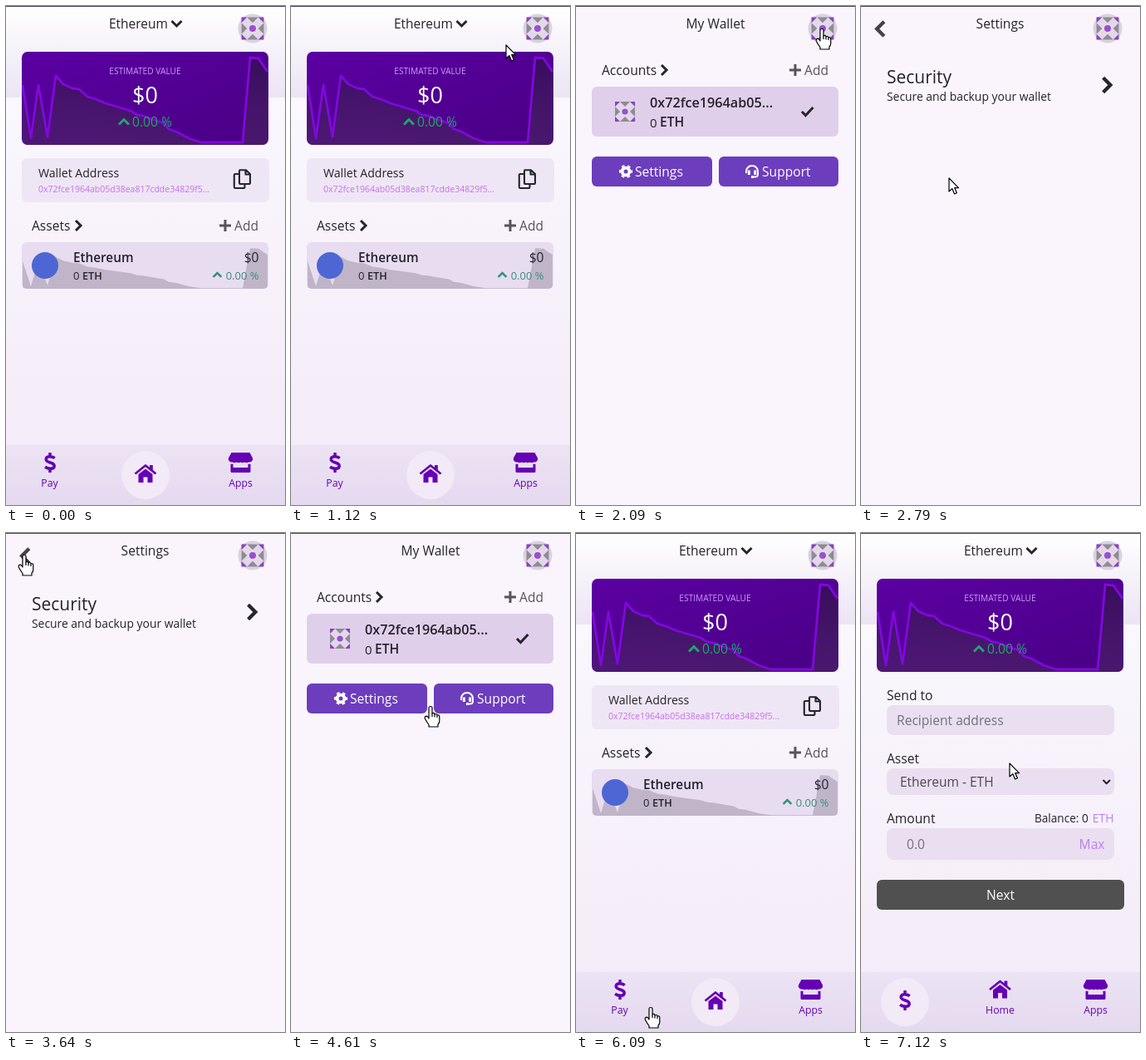
These frames come from a looping animation (336 by 600 pixels, 7.18 s). An HTML page:

```html
<!DOCTYPE html>
<html lang="en">
<head>
<meta charset="utf-8">
<title>Wallet walkthrough</title>
<style>
html, body { margin: 0; width: 100%; height: 100%; overflow: hidden; background: #faf5fc; }
svg { display: block; width: 336px; height: 600px; font: 15.6px "Open Sans", "Noto Sans", sans-serif; fill: #25222b; color: #25252c; }
.mid { text-anchor: middle; }
.end { text-anchor: end; }
.bold { font-weight: 600; }
.btn { font-weight: 500; fill: #fff; }
.s10 { font-size: 10.2px; }
.s13 { font-size: 13px; }
.nav { font-size: 12.3px; text-anchor: middle; }
.brand { fill: #6500b5; }
.grey { fill: #757079; }
.lilac { fill: #bd7deb; }
.line { fill: none; stroke: currentColor; stroke-width: 3; }
.thin { stroke-width: 2.1; stroke-linejoin: round; }
.field { fill: #eadff0; }

/* Page cuts and cursor, 7180 ms per loop */
.page, .arrow, .hand { opacity: 0; animation: 7180ms step-end infinite; }
.base { animation-name: base; }
.home { animation-name: home; }
.wallet { animation-name: wallet; }
.settings { animation-name: settings; }
.pay { animation-name: pay; }
.arrow { animation-name: arrow; }
.hand { animation-name: hand; }
.cursor { animation: move 7180ms ease-in-out infinite; }

@keyframes base { 0%, 70.752% { opacity: 1 } 25.07% { opacity: 0 } 100% { opacity: 1 } }
@keyframes home { 0%, 70.752% { opacity: 1 } 25.07%, 89.415%, 100% { opacity: 0 } }
@keyframes wallet { 0%, 36.908%, 70.752%, 100% { opacity: 0 } 25.07%, 54.318% { opacity: 1 } }
@keyframes settings { 0%, 54.318%, 100% { opacity: 0 } 36.908% { opacity: 1 } }
@keyframes pay { 0% { opacity: 0 } 89.415%, 100% { opacity: 1 } }
@keyframes hand {
  0%, 31.894%, 37.465%, 54.735%, 65.32%, 71.309%, 92.758%, 100% { opacity: 0 }
  22.981%, 34.819%, 48.05%, 63.928%, 68.106%, 84.262% { opacity: 1 }
}
@keyframes arrow {
  0%, 22.981%, 34.819%, 48.05%, 63.928%, 68.106%, 84.262% { opacity: 0 }
  9.749%, 31.894%, 37.465%, 54.735%, 65.32%, 71.309%, 92.758%, 100% { opacity: 1 }
}
@keyframes move {
  0%, 9.749% { transform: translate(93px, 600px); animation-timing-function: ease-in }
  11.838% { transform: translate(143px, 433px); animation-timing-function: ease-out }
  15.599%, 20.891% { transform: translate(259px, 47px) }
  23.677%, 31.337% { transform: translate(296px, 28px) }
  35.515%, 42.479% { transform: translate(106px, 207px) }
  48.747%, 61.699% { transform: translate(22px, 27px) }
  64.206% { transform: translate(168px, 209px) }
  68.942%, 73.12% { transform: translate(296px, 28px) }
  84.819% { transform: translate(90px, 571px) }
  87.047%, 92.618% { transform: translate(55px, 562px) }
  98.886%, 100% { transform: translate(179px, 277px) }
}
</style>
</head>
<body>
<svg viewBox="0 0 336 600">
  <defs>
    <linearGradient id="top" x2="0" y2="1"><stop stop-color="#fff"/><stop offset="1" stop-color="#ece4f4"/></linearGradient>
    <linearGradient id="body" x2="0" y2="1"><stop stop-color="#faf7fd"/><stop offset="1" stop-color="#f4ecf8"/></linearGradient>
    <linearGradient id="dock" x2="0" y2="1"><stop stop-color="#ece3f4"/><stop offset="1" stop-color="#e5d9ef"/></linearGradient>
    <linearGradient id="deep" x2="1" y2="1"><stop stop-color="#5b00a3"/><stop offset="1" stop-color="#490084"/></linearGradient>
    <linearGradient id="shade" x2="0" y2="1"><stop stop-color="#2a1440" stop-opacity=".65"/><stop offset="1" stop-color="#4a3058" stop-opacity=".5"/></linearGradient>
    <clipPath id="frame"><rect width="297" height="112" rx="7"/></clipPath>
    <clipPath id="row"><rect x="19" y="284" width="297" height="56" rx="6"/></clipPath>

    <path id="trend" d="M1 40L11 104L20 40L31 102L41 29L50 39L61 44L69 45L79 54L89 57L101 62L111 65L131 71L139 76L146 77L156 81L171 86L177 93L186 96L201 104L216 109H266L275 7L285 8L296 24"/>
    <path id="area" d="M1 40L11 104L20 40L31 102L41 29L50 39L61 44L69 45L79 54L89 57L101 62L111 65L131 71L139 76L146 77L156 81L171 86L177 93L186 96L201 104L216 109H266L275 7L285 8L296 24V112H1Z"/>
    <path id="chev" class="line" d="M-6 -3L0 3L6 -3"/>
    <path id="plus" class="line" d="M-7 0H7M0 -7V7"/>

    <g id="quarter">
      <path fill="#8b43bd" d="M-12 -12H-6L-12 -6Z"/>
      <path fill="#8f8a94" d="M-6 -12H6L0 -6Z"/>
    </g>
    <g id="avatar">
      <path fill="#e1d8e8" d="M-12 -12H12V12H-12Z"/>
      <use href="#quarter"/><use href="#quarter" transform="rotate(90)"/>
      <use href="#quarter" transform="rotate(180)"/><use href="#quarter" transform="rotate(270)"/>
      <circle r="6" fill="#e4dbea"/><circle r="3.6" fill="#9a4fd0"/>
    </g>

    <path id="dollar" fill="none" stroke="#6500b5" stroke-width="3.5" d="M5.7 -5.3C2 -8 -4.8 -8.2 -4.8 -4C-4.8 1 5.2 -1 5.2 4C5.2 8.4 -2 8 -6 5.2M0 -12V-7M0 7V12"/>
    <g id="house" class="brand">
      <path fill="none" stroke="#6500b5" stroke-width="2.8" stroke-linejoin="round" d="M-12.5 .5L0 -9.5L12.5 .5"/>
      <path d="M-8.5 1L0 -5.5L8.5 1V11H2.5V4.5H-2.5V11H-8.5ZM5 -10H8.8V-3L5 -6Z"/>
    </g>
    <g id="store">
      <path d="M-11 -12H11L14.5 -5.5C15.5 -2 12 0 9.5 -.5Q7 1 4.8 -.6Q2.4 1 0 -.6Q-2.4 1 -4.8 -.6Q-7 1 -9.5 -.5C-12 0 -15.5 -2 -14.5 -5.5Z"/>
      <path d="M-12 1.8H-9V6H9V1.8H12V10.5Q12 12 10.5 12H-10.5Q-12 12 -12 10.5Z"/>
    </g>
    <g id="add" color="#57525c">
      <use href="#plus" x="264"/><text class="end" x="304" y="6" fill="#57525c">Add</text>
    </g>
  </defs>

  <rect width="336" height="600" fill="#faf5fc"/>

  <g class="page base">
    <rect width="336" height="110" fill="url(#top)"/>
    <rect y="110" width="336" height="418" fill="url(#body)"/>
    <rect y="528" width="336" height="72" fill="url(#dock)"/>
    <text x="124" y="27" font-size="15.5">Ethereum</text>
    <use href="#chev" x="205.5" y="21"/>
    <g transform="translate(19 55)" clip-path="url(#frame)">
      <rect width="297" height="112" fill="url(#deep)"/>
      <use href="#area" fill="url(#shade)"/>
      <use href="#trend" fill="none" stroke="#8008dc" stroke-width="2.8" stroke-linejoin="round"/>
    </g>
    <text class="mid s10" x="167.5" y="82" fill="#cf97f5">ESTIMATED VALUE</text>
    <text class="mid" x="167.5" y="117" font-size="27" fill="#fff">$0</text>
    <g color="#20a66b">
      <use href="#chev" transform="translate(142 139.5) rotate(180)"/>
      <text x="152" y="145" fill="#20a66b">0.00 %</text>
    </g>
    <use href="#store" class="brand" x="282.5" y="549"/>
    <text class="nav brand" x="282.5" y="578">Apps</text>
  </g>

  <g class="page home">
    <rect x="19" y="183" width="298" height="53" rx="6" fill="#efe6f5"/>
    <text x="39" y="206" font-size="14.1">Wallet Address</text>
    <text x="39" y="224" font-size="10.5" fill="#c570ea">0x72fce1964ab05d38ea817cdde34829f5...</text>
    <g class="line thin">
      <path d="M281.5 197.2H289L294 202V212.5Q294 214 292.5 214H282.5Q281 214 281 212.5V198.5Q281 197.2 282 197.2ZM288.5 197.5V202.5H293.5"/>
      <path d="M280 202H276Q274.8 202 274.8 203.3V217.5Q274.8 219 276 219H286Q287.5 219 287.5 217.5V215"/>
    </g>

    <text x="31" y="270">Assets</text>
    <use href="#chev" transform="translate(87 264) rotate(-90)"/>
    <use href="#add" y="264"/>

    <g clip-path="url(#row)">
      <rect x="19" y="284" width="297" height="56" fill="#e8dcf1"/>
      <use href="#area" transform="translate(19 288) scale(1 .47)" fill="#635b68" fill-opacity=".3"/>
    </g>
    <circle cx="47" cy="312" r="16" fill="#4d66d3"/>
    <text class="bold" x="81" y="308" font-size="15.3">Ethereum</text>
    <text class="s13" x="81" y="329">0</text>
    <text class="bold" x="92" y="329" font-size="12.6">ETH</text>
    <text class="end" x="304.5" y="308">$0</text>
    <g color="#36907a">
      <use href="#chev" transform="translate(254.5 323.5) rotate(180) scale(.82)"/>
      <text class="end s13" x="304.5" y="329" fill="#36907a">0.00 %</text>
    </g>

    <use href="#dollar" x="53" y="549"/>
    <text class="nav brand" x="52.5" y="578">Pay</text>
    <circle cx="168" cy="564" r="29" fill="#f2eaf7"/>
    <use href="#house" x="168" y="562"/>
  </g>

  <g class="page pay">
    <text x="31" y="201">Send to</text>
    <rect class="field" x="31" y="207" width="274" height="36" rx="8"/>
    <text class="grey" x="43" y="231">Recipient address</text>
    <text x="31" y="277">Asset</text>
    <rect class="field" x="31" y="283" width="274" height="32" rx="8"/>
    <text x="47" y="305" font-size="15.5" fill="#4c4652">Ethereum - ETH</text>
    <path class="line thin" d="M291.5 297L295.7 301.2L300 297"/>
    <text x="31" y="349">Amount</text>
    <text x="209" y="348" font-size="13.6">Balance: 0</text>
    <text class="end lilac" x="304.5" y="348" font-size="13.9">ETH</text>
    <rect class="field" x="31" y="355" width="274" height="38" rx="8"/>
    <text class="grey" x="55" y="380">0.0</text>
    <text class="end lilac" x="293.5" y="380">Max</text>
    <rect x="19" y="417" width="298" height="36" rx="6" fill="#505050"/>
    <text class="btn mid" x="168" y="441">Next</text>
    <circle cx="53" cy="564" r="29" fill="#f2eaf7"/>
    <use href="#dollar" x="53" y="562"/>
    <use href="#house" x="167.5" y="548.5"/>
    <text class="nav brand" x="167.5" y="578">Home</text>
  </g>

  <g class="page wallet">
    <text class="mid" x="168" y="27">My Wallet</text>
    <text x="31" y="83">Accounts</text>
    <use href="#chev" transform="translate(106 77) rotate(-90)"/>
    <use href="#add" y="77"/>
    <rect x="19" y="97" width="297" height="60" rx="6" fill="#e0cfeb"/>
    <use href="#avatar" x="59" y="127"/>
    <text class="bold" x="89" y="122" font-size="16.2">0x72fce1964ab05...</text>
    <text x="89" y="146" font-size="15">0</text>
    <text class="bold" x="101" y="145">ETH</text>
    <path class="line" d="M272 127L276.5 131.5L285.5 122"/>
    <rect x="19" y="181" width="145" height="36" rx="6" fill="#6c3dbc"/>
    <rect x="172" y="181" width="144" height="36" rx="6" fill="#6c3dbc"/>
    <g fill="none" stroke="#fff" transform="translate(60 199)">
      <circle r="4.4" stroke-width="3.8"/>
      <circle r="6.6" stroke-width="3" stroke-dasharray="3.456" stroke-dashoffset="1.7"/>
    </g>
    <g fill="none" stroke="#fff" stroke-width="2" transform="translate(212 199)">
      <path d="M-7 2V0A7 7 0 0 1 7 0V3Q7 6.5 3.5 6.5H0"/>
      <path stroke-width="3" d="M-3.7 -1.5V4M3.7 -1.5V4M-1 6.5H2"/>
    </g>
    <text class="btn" x="71" y="205">Settings</text>
    <text class="btn" x="224" y="205">Support</text>
  </g>

  <g class="page settings">
    <use href="#chev" color="#45414a" transform="translate(23.5 27.5) rotate(90) scale(1.45)"/>
    <text class="mid" x="167.5" y="27">Settings</text>
    <text x="31" y="93" font-size="21">Security</text>
    <text x="31" y="114" font-size="13.9">Secure and backup your wallet</text>
    <use href="#chev" transform="translate(296 95) rotate(-90) scale(1.45)"/>
  </g>

  <circle cx="297" cy="27" r="17.5" fill="#d9d3df"/>
  <use href="#avatar" transform="translate(297 27) scale(1.12)"/>
  <rect width="336" height="1" fill="#4b4650"/>

  <g class="cursor" fill="#fff" stroke="#000" stroke-width="1.2" stroke-linejoin="round">
    <path class="arrow" d="M0 0V16L3.8 12.6L6.6 19L9.4 17.8L6.7 11.6H11.5Z"/>
    <g class="hand">
      <path d="M-2 1Q-2 -.5 0 -.5Q2 -.5 2 1V8Q4.5 6.3 5 9Q7.5 7.6 8 10Q10.8 9 10.8 12V17Q10.8 19.5 9 21V24H-2V21.5Q-4 19 -6.5 14.5Q-7.6 11.5 -5 11.2Q-3.4 11.2 -2 14Z"/>
      <path fill="none" d="M2 8V12M5 9V12.5M8 10V13"/>
    </g>
  </g>
</svg>
</body>
</html>
```
